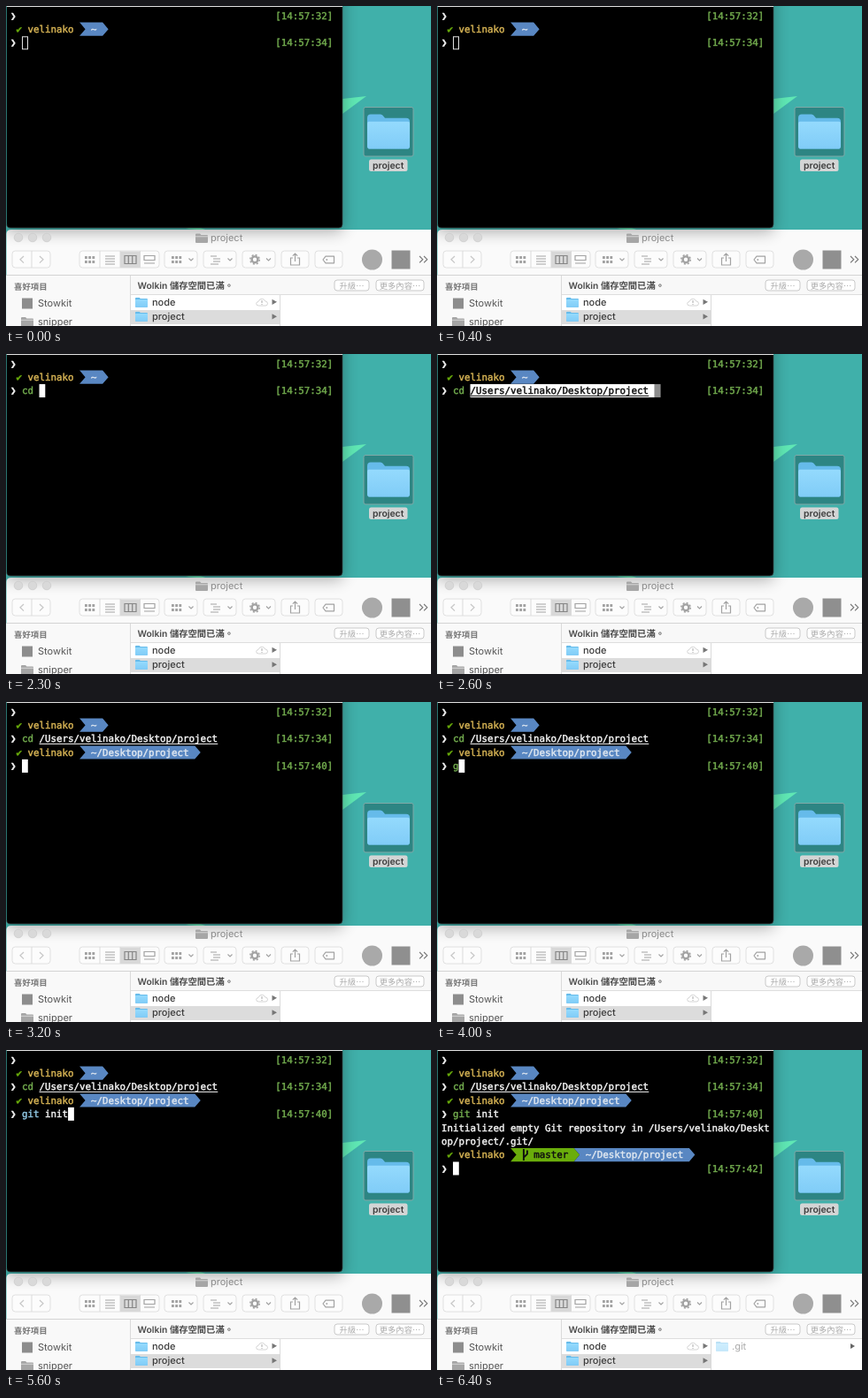
Write an HTML page that moves like this. It is 480x362 px and loops after 6.5 s.

```html
<!DOCTYPE html>
<html lang="zh-Hant">
<head>
<meta charset="utf-8">
<title>Terminal and file window</title>
<style>
  html, body { margin: 0; width: 100%; height: 100%; overflow: hidden; background: #40b0aa; }
  svg { display: block; width: 480px; height: 362px; }
  text { white-space: pre; text-rendering: geometricPrecision; }
  .ui text { font-family: Inter, "Noto Sans CJK TC", "Noto Sans CJK", sans-serif; font-size: 11px; fill: #3c3c3c; }
  #term text {
    font: 10.81px "DejaVu Sans Mono", monospace;
    stroke: currentColor; stroke-width: .45; fill: currentColor;
  }
  .btn { fill: #fcfcfc; stroke: #e0e0e0; }
  .ico { fill: none; stroke: #a2a2a2; stroke-width: 1.2; }
  .dot { fill: #a2a2a2; }
</style>
</head>
<body>
<svg viewBox="0 0 480 362" xmlns="http://www.w3.org/2000/svg">
  <defs>
    <linearGradient id="blue" x2="0" y2="1">
      <stop stop-color="#94dafd"/><stop offset="1" stop-color="#80ccf7"/>
    </linearGradient>
    <filter id="soft" x="-20%" y="-20%" width="140%" height="140%"><feGaussianBlur stdDeviation="9"/></filter>
    <symbol id="folder" viewBox="0 0 48 40" preserveAspectRatio="none">
      <path d="M0 5Q0 1 4 1H15Q17 1 19 4L20 5H44Q48 5 48 9V36Q48 39 45 39H3Q0 39 0 36Z" fill="#66bbea"/>
      <path d="M0 11Q0 9 2 9H46Q48 9 48 11V36Q48 39 45 39H3Q0 39 0 36Z" fill="url(#blue)"/>
    </symbol>
    <symbol id="grayFolder" viewBox="0 0 14 12">
      <path d="M0 2Q0 1 1 1H5L6.5 2.5H13Q14 2.5 14 3.5V10.5Q14 11.5 13 11.5H1Q0 11.5 0 10.5Z" fill="#a6a6a6"/>
      <path d="M0 4.3H14" stroke="#e2e2e2" stroke-width=".8"/>
    </symbol>
  </defs>

  <g class="ui">
    <rect width="480" height="362" fill="#40b0aa"/>
    <path d="M380 105L407 102L380 122Z" fill="#5fe7b4"/>
    <path d="M203 252L214 249L228 254Z" fill="#5fe7b4"/>
    <rect x="404" y="114.500" width="56" height="55.500" rx="2" fill="#2d8583" stroke="#7fa9a7"/>
    <use href="#folder" x="408" y="121.500" width="48" height="41"/>
    <rect x="410" y="173.500" width="43.500" height="13.500" rx="2.500" fill="#d3d5d5"/>
    <text x="431.700" y="184" text-anchor="middle" font-weight="600" style="font-size:10.4px">project</text>
  </g>

  <g class="ui">
    <path d="M.5 362V258Q.5 253 6 253H480V362Z" fill="#fafafa"/>
    <path d="M.5 305H480V362H.5Z" fill="#fff"/>
    <path d="M.5 305H140.500V362H.5Z" fill="#f9f9f9"/>
    <path d="M141 305H480V326H141Z" fill="#f8f8f8"/>
  </g>
  <rect x="0" y="-20" width="380" height="275" fill="#000" opacity=".32" filter="url(#soft)"/>

  <path d="M.8 0H380V247Q380 251 376 251H5Q.8 251 .8 247Z" fill="#000"/>
  <path d="M.8 .5H380" stroke="#e2e2e2"/>
  <path d="M380 1V247Q380 251 376 251H5Q.8 251 .8 247" fill="none" stroke="#3a4a4a" stroke-width=".7"/>
  <g id="term"></g>

  <g class="ui">
    <g fill="#d9d9d9" stroke="#c6c6c6" stroke-width=".6">
      <circle cx="14" cy="262" r="4.800"/><circle cx="30" cy="262" r="4.800"/><circle cx="46" cy="262" r="4.800"/>
    </g>
    <use href="#grayFolder" x="214" y="256.500" width="14" height="12"/>
    <text x="231" y="266" style="fill:#8b8b8b">project</text>

    <g id="buttons"></g>
    <path class="ico" d="M20 283l-4 3.800 4 3.800M38 283l4 3.800-4 3.800" stroke-opacity=".6"/>
    <path d="M129 277.500H151.500V296H129Z" fill="#d8d8d8"/>
    <path d="M29 277V296M106 277V296M129 277V296M151.500 277V296" stroke="#dadada"/>
    <g id="dots" class="dot"></g>
    <path class="ico" d="M112 283H123M112 286H123M112 289H123M112 292H123"/>
    <path class="ico" d="M134 282.500H147V291.500H134ZM138.300 282.500V291.500M142.700 282.500V291.500" style="stroke:#858585"/>
    <path class="ico" d="M156 282.500H168V287.500H156ZM156 291H168"/>
    <path class="ico" d="M231 283H238M234 286H242M234 289H242M231 292H240"/>
    <circle class="ico" cx="281" cy="286.800" r="3.400" style="stroke-width:2.4"/>
    <circle class="ico" cx="281" cy="286.800" r="5.200" stroke-dasharray="2 2.080" style="stroke-width:1.6"/>
    <path class="ico" d="M206.500 285.500l2.500 2.500 2.500-2.500M250.500 285.500l2.500 2.500 2.500-2.500M294 285.500l2.500 2.500 2.500-2.500"/>
    <path class="ico" d="M324 285H321.500V293H331.500V285H329M326.500 289V280M323.800 282.700L326.500 280L329.200 282.700"/>
    <path class="ico" d="M358 287L361 283.200H370.500V290.800H361Z" stroke-linejoin="round"/>
    <circle class="dot" cx="362.300" cy="287" r=".9"/>
    <circle cx="413.500" cy="287" r="11.500" fill="#a9a9a9"/>
    <rect x="435.500" y="276.500" width="21" height="21" fill="#8f8f8f"/>
    <path class="ico" d="M467 283l3.700 3.700-3.700 3.700M472 283l3.700 3.700-3.700 3.700" style="stroke:#777"/>

    <path d="M.5 304.500H480" stroke="#d4d4d4"/>
    <path d="M140.500 305V362M309.500 326V362" stroke="#dadada"/>
    <path d="M141 326.500H480" stroke="#dedede"/>
    <text x="9" y="320.500" font-weight="600" style="font-size:9.4px;fill:#777">喜好項目</text>
    <rect x="18" y="330.500" width="12" height="12" fill="#8d8d8d"/>
    <text x="36" y="340.300" style="fill:#555">Stowkit</text>
    <use href="#grayFolder" x="17" y="351" width="14" height="12"/>
    <text x="36" y="361.300" style="fill:#555">snipper</text>
    <text x="148.500" y="319.800" font-weight="600" style="font-size:10.3px;fill:#4a4a4a">Wolkin 儲存空間已滿。</text>
    <g fill="#fff" stroke="#c9c9c9">
      <rect x="371" y="310" width="39" height="12" rx="3"/><rect x="418" y="310" width="54" height="12" rx="3"/>
    </g>
    <text x="390.500" y="319.500" text-anchor="middle" style="font-size:9.3px;fill:#aaa">升級⋯</text>
    <text x="445" y="319.500" text-anchor="middle" style="font-size:9.3px;fill:#aaa">更多內容⋯</text>
    <path d="M141 344H309V360H141Z" fill="#dcdcdc"/>
    <use href="#folder" x="146" y="329.500" width="14" height="11.500"/>
    <text x="165" y="339.300" font-weight="500">node</text>
    <use href="#folder" x="146" y="345.500" width="14" height="11.500"/>
    <text x="165" y="355.300" font-weight="500">project</text>
    <path d="M300.500 331.700L306 334.800L300.500 338ZM300.500 348.200L306 351.300L300.500 354.500Z" fill="#777"/>
    <path d="M285.500 339Q282.500 339 282.700 336.500Q283 334.500 285 334.500Q286 331 289.500 331.300Q292 331.600 292.700 334Q295.500 334 295.500 336.700Q295.200 339 293 339Z" fill="#fff" stroke="#c9c9c9" stroke-width=".8"/>
    <path d="M289 333V336M289 337V338" stroke="#aaa"/>
    <g id="repo" opacity="0">
      <use href="#folder" x="315" y="329.500" width="14" height="11.500" opacity=".45"/>
      <text x="333" y="339.300" style="fill:#aaa">.git</text>
      <path d="M467 332L472 335L467 338Z" fill="#666"/>
    </g>
  </g>
</svg>
<script>
const LOOP = 6500, CW = 6.508, LH = 15.4;
const USER = 'velinako', PATH = `/Users/${USER}/Desktop/project`;
const C = {
  white: '#f4f4f4', soft: '#dfe7f0', green: '#72ab4e', gold: '#d6b354', blue: '#5987c2',
  lime: '#6aad0b', pale: '#f3e79a', sky: '#91c9e5'
};
const $ = id => document.getElementById(id);
const col = n => 5 + n * CW;
const mid = row => 10.8 + row * LH;

// time, stage, typed text, command colour, cursor style
const steps = [
  [0, 0, '', C.pale, 'hollow'],
  [900, 0, '', C.pale],
  [1200, 0, 'c', C.pale],
  [1400, 0, 'cd', C.pale],
  [1600, 0, 'cd ', C.green],
  [2400, 1, '', C.green, 'dim'],
  [3000, 2, '', C.green],
  [4000, 2, 'g', C.green],
  [4200, 2, 'gi', C.green],
  [4300, 2, 'git', C.green],
  [4500, 2, 'git ', C.green],
  [4700, 2, 'git i', C.green],
  [4900, 2, 'git in', C.green],
  [5100, 2, 'git ini', C.green],
  [5300, 2, 'git init', C.green],
  [5500, 2, 'git init', C.sky],
  [6000, 3, '', C.green]
];

const text = (row, n, s, color, bold) =>
  `<text x="${col(n)}" y="${mid(row) + 3.7}" color="${color}"${bold ? ' style="font-weight:700"' : ''}>${s}</text>`;
const rect = (row, n, cells, fill) =>
  `<rect x="${col(n)}" y="${mid(row) - 7.5}" width="${cells * CW}" height="15" fill="${fill}"/>`;

// Powerline block: notch on the left, point on the right
function segment(row, from, to, fill) {
  const y = mid(row), h = 7.6, a = col(from), b = col(to);
  return `<path d="M${a} ${y - h}H${b}L${b + CW} ${y}L${b} ${y + h}H${a}L${a + CW} ${y}Z" fill="${fill}"/>`;
}

function status(row, dir, branch) {
  let n = 12, s = text(row, 1, '✔', C.lime) + text(row, 3, USER, C.gold);
  if (branch) {
    const x = col(14) + 1.8, y = mid(row);
    s += segment(row, 12, 23, C.lime) + text(row, 16, branch, '#101010') +
      `<path d="M${x} ${y - 6.5}V${y + 6.5}M${x + 4} ${y - 5}V${y - 1}L${x} ${y + 3}" fill="none" stroke="#101010" stroke-width="1.9"/>`;
    n = 23;
  }
  return s + segment(row, n, n + 3 + dir.length, C.blue) + text(row, n + 2, dir, C.soft);
}

const prompt = (row, sec) =>
  text(row, 0, '❯', C.white, true) + (sec ? text(row, 46, `[14:57:${sec}]`, C.green) : '');

function command(row, typed, color) {
  const [head, ...rest] = typed.split(' ');
  return text(row, 2, head, color, color === C.pale) + text(row, 3 + head.length, rest.join(' '), C.white);
}

function cursor(row, n, style) {
  if (style === 'hollow')
    return `<rect x="${col(n) + .5}" y="${mid(row) - 6.8}" width="6" height="14" fill="none" stroke="#e4e4e4"/>`;
  return rect(row, n, 1.04, style === 'dim' ? '#8c8c8c' : '#fff');
}

function pathText(marked) {
  const ink = marked ? '#111' : C.white, y = mid(2) + 5.8;
  return (marked ? rect(2, 5, 32, '#fff') : '') + text(2, 5, PATH, ink) +
    `<path d="M${col(5)} ${y}H${col(5 + PATH.length)}" stroke="${ink}"/>`;
}

function draw([, stage, typed, color, style]) {
  let s = prompt(0, 32) + status(1, '~') + prompt(2, 34);
  if (stage === 0) s += command(2, typed, color) + cursor(2, 2 + typed.length, style);
  else s += command(2, 'cd', C.green) + pathText(stage === 1);
  if (stage === 1) s += cursor(2, 37, style);
  if (stage >= 2) {
    s += status(3, '~/Desktop/project') + prompt(4, 40);
    s += command(4, stage === 2 ? typed : 'git init', color);
  }
  if (stage === 2) s += cursor(4, 2 + typed.length, style);
  if (stage === 3) {
    const out = `Initialized empty Git repository in ${PATH}/.git/`;
    s += text(5, 0, out.slice(0, 57), C.white) + text(6, 0, out.slice(57), C.white) +
      status(7, '~/Desktop/project', 'master') + prompt(8, 42) + cursor(8, 2);
  }
  $('term').innerHTML = s;
}

$('buttons').innerHTML = [[7, 43], [83, 90], [179, 37], [223, 37], [267, 37], [311, 31], [349, 31]]
  .map(([x, w]) => `<rect class="btn" x="${x}" y="277" width="${w}" height="19" rx="3.500"/>`).join('');
const cells = x => [0, 1, 2, 3, 4, 5].map(i =>
  `<rect x="${x + i % 3 * 4.2}" y="${283 + (i > 2) * 5}" width="2.800" height="3"/>`).join('');
$('dots').innerHTML = cells(89) + cells(187);

let shown = -1;
function tick() {
  const t = performance.now() % LOOP;
  const i = steps.findLastIndex(s => s[0] <= t);
  if (i !== shown) draw(steps[shown = i]);
  $('repo').setAttribute('opacity', t >= 6200 ? 1 : 0);
  requestAnimationFrame(tick);
}
tick();
</script>
</body>
</html>
```
